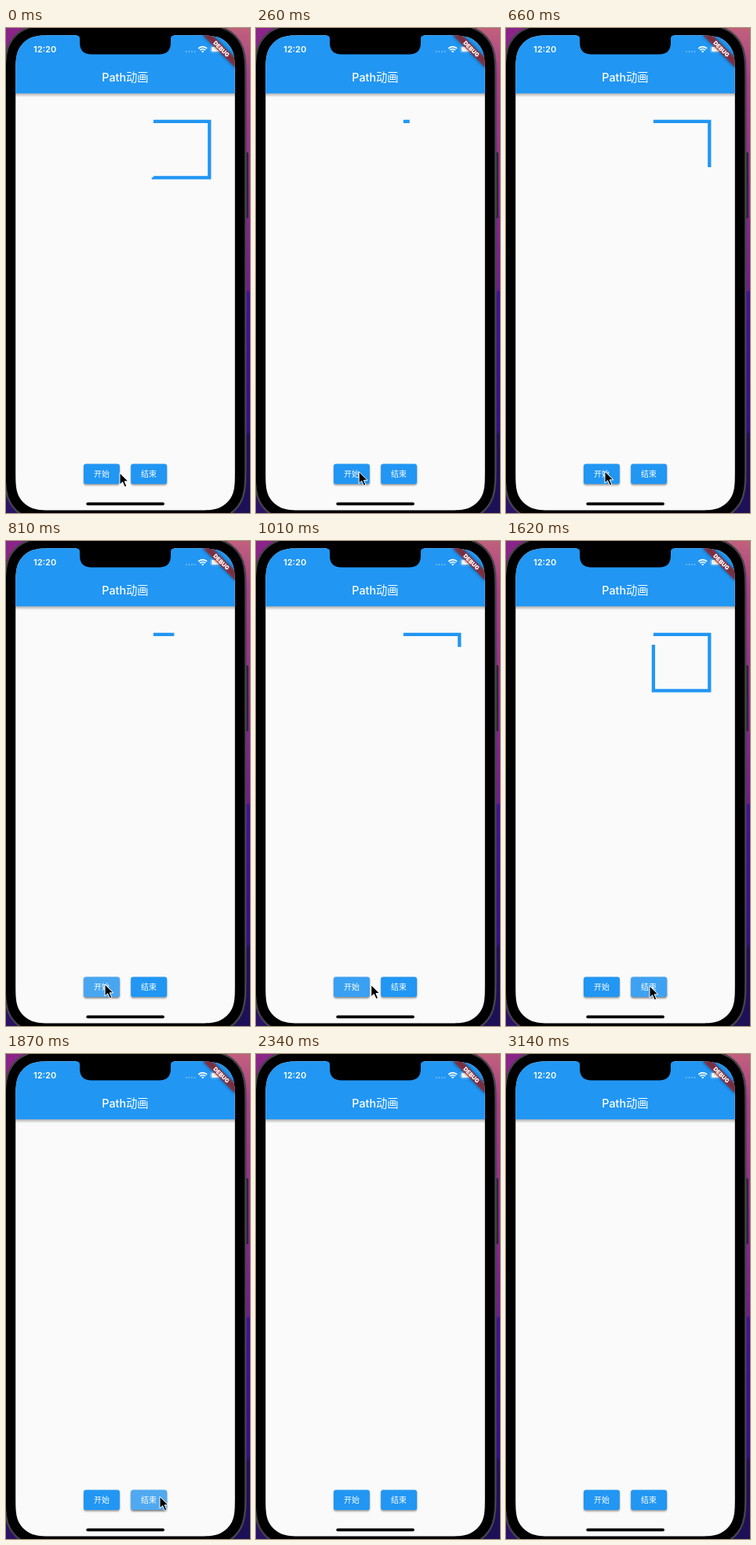
These frames come from a looping animation (311x617 px, 3.24 s). An HTML page:

```html
<!DOCTYPE html>
<html lang="zh">
<head>
<meta charset="utf-8">
<title>Path动画</title>
<style>
  html, body { margin: 0; height: 100%; overflow: hidden; background: #000; }
  svg { display: block; width: 100vw; height: 100vh; }
  text { fill: #fff; font-family: Inter, "Noto Sans CJK SC", "Noto Sans CJK", sans-serif; text-anchor: middle; }
  .shadow { filter: blur(1.1px); fill-opacity: .4; }
  .wide { filter: blur(2.2px); fill-opacity: .5; }
</style>
</head>
<body>
<svg viewBox="0 0 311 617">
  <defs>
    <linearGradient id="wallpaper" x2="0" y2="1">
      <stop offset="0" stop-color="#c0607c"/>
      <stop offset=".1" stop-color="#a83f86"/>
      <stop offset=".54" stop-color="#711c8c"/>
      <stop offset=".545" stop-color="#431294"/>
      <stop offset=".83" stop-color="#340f86"/>
      <stop offset=".84" stop-color="#22105a"/>
      <stop offset="1" stop-color="#1c1056"/>
    </linearGradient>
    <linearGradient id="barShadow" x2="0" y2="1">
      <stop offset="0" stop-opacity=".3"/>
      <stop offset=".5" stop-opacity=".15"/>
      <stop offset="1" stop-opacity="0"/>
    </linearGradient>
    <clipPath id="screen"><path id="screenShape"/></clipPath>
    <g id="button">
      <rect class="shadow" y="1.6" width="45.9" height="25.7" rx="2.9"/>
      <rect width="45.9" height="25.7" rx="2.9" fill="#2196f3"/>
      <rect class="glow" width="45.9" height="25.7" rx="2.9" fill="#e6e6e6"/>
    </g>
  </defs>

  <rect width="311" height="617" fill="url(#wallpaper)"/>
  <rect width="60" height="100" fill="#8a2488"/>
  <rect y="500" width="60" height="117" fill="#2a1266"/>
  <rect x="304" y="158" width="5" height="84" rx="1.5" fill="#2b2430"/>
  <path id="frame" stroke="#45434a" stroke-width="2.4"/>

  <g clip-path="url(#screen)">
    <rect width="311" height="617" fill="#fafafa"/>
    <rect y="83" width="311" height="5" fill="url(#barShadow)"/>
    <rect width="311" height="83.1" fill="#2196f3"/>
    <text x="152" y="68" font-size="14.3" font-weight="500">Path动画</text>
    <text x="49.6" y="31" font-size="11" font-weight="600">12:20</text>
    <path d="M229 30h13" stroke="#fff" stroke-opacity=".45" stroke-width="1.7" stroke-dasharray="1.7 1.9"/>
    <path d="M245.3 26.1a7.7 7.7 0 0 1 10.8 0M247.3 28.2a4.9 4.9 0 0 1 6.8 0" fill="none" stroke="#fff" stroke-width="1.7"/>
    <path d="M249 29.6a2.4 2.4 0 0 1 3.4 0l-1.7 1.9z" fill="#fff"/>
    <rect x="260.6" y="22.9" width="16.4" height="8.2" rx="2.3" fill="none" stroke="#fff" stroke-opacity=".45" stroke-width=".8"/>
    <rect x="261.9" y="24.1" width="13.8" height="5.8" rx="1.3" fill="#fff"/>
    <g transform="translate(291.7 9.4) rotate(45)">
      <rect class="wide" x="-29" y="20" width="58" height="8.6"/>
      <rect x="-29" y="20" width="58" height="8.6" fill="#b71c1c" fill-opacity=".63"/>
      <text y="27" font-size="7.3" font-weight="900">DEBUG</text>
    </g>
    <path id="square" d="M187.9 118.9h71.4v71.4H187.9Z" pathLength="1" fill="none" stroke="#2196f3" stroke-width="4.3"/>
    <g id="start" transform="translate(99 554.4)"></g>
    <g id="stop" transform="translate(159.2 554.4)"></g>
    <g font-size="10" font-weight="500">
      <text x="122" y="571">开始</text>
      <text x="182" y="571">结束</text>
    </g>
    <rect x="102.3" y="603.6" width="99.6" height="3.6" rx="1.8"/>
  </g>
  <path d="M90 9V9.5q4 0 4 4v5q0 15 15 15h86q15 0 15-15v-5q0-4 4-4V9Z"/>
  <path id="cursor" d="M0 0V15L3.5 11.7 6.3 17.8 8.8 16.7 6.2 10.8H10.9Z" stroke="#fff" stroke-linejoin="round"/>
</svg>
<script>
const LOOP = 3240, START = 724, STOP = 1715, LEAVE = 2330;
const PERIOD = 940;

const $ = id => document.getElementById(id);
const clamp = v => Math.min(1, Math.max(0, v));
const ramp = (t, from, to) => clamp((t - from) / (to - from));
const easeOut = v => 1 - (1 - v) ** 2;

// Rounded rectangle whose curvature eases into the straight sides.
function smoothRect(x, y, w, h, r) {
  const half = [[0, 1.529], [0, 1.088], [0, .868], [.075, .631], [.169, .373]];
  const curve = [...half, ...half.map(([u, v]) => [v, u]).reverse()];
  const corner = (cx, cy, sx, sy) => {
    const points = sx === sy ? curve : curve.toReversed();
    const [first, ...rest] = points.map(([u, v]) => `${cx + sx * u * r} ${cy + sy * v * r}`);
    return `L${first}C${rest.join(" ")}`;
  };
  const path = corner(x, y, 1, 1) + corner(x + w, y, -1, 1) +
    corner(x + w, y + h, -1, -1) + corner(x, y + h, 1, -1);
  return "M" + path.slice(1) + "Z";
}

// Cursor trips: start time, end time, distance in x and y.
const moves = [[60, 480, -19, -2], [930, 1330, 57, 2], [1650, 1870, 13, -3], [2130, 2340, 40, 44]];

function cursorAt(t) {
  let x = 145, y = 566;
  for (const [from, to, dx, dy] of moves) {
    const part = easeOut(ramp(t, from, to));
    x += dx * part;
    y += dy * part;
  }
  return [x, y];
}

// Share of the square drawn; pressing start begins again from zero.
function progress(t) {
  if (t >= STOP) return 0;
  return t < START ? (.75 + t / PERIOD) % 1 : (t - START) / PERIOD % 1;
}

function glow(id, amount) {
  $(id).querySelector(".glow").style.opacity = amount;
  $(id).querySelector(".shadow").style.fillOpacity = .4 + amount / 2;
}

function draw(t) {
  const drawn = progress(t);
  $("square").style.visibility = drawn ? "visible" : "hidden";
  $("square").setAttribute("stroke-dasharray", `${drawn} 2`);
  glow("start", .2 * (ramp(t, START, 760) - ramp(t, 810, 1330)));
  glow("stop", .24 * (ramp(t, 1450, 1730) - ramp(t, 2130, 2330)));
  $("cursor").setAttribute("transform", `translate(${cursorAt(t)})`);
  $("cursor").style.visibility = t < LEAVE ? "visible" : "hidden";
}

$("screenShape").setAttribute("d", smoothRect(12.2, 9.3, 279.6, 604.2, 34));
$("frame").setAttribute("d", smoothRect(-1.4, -4, 306.8, 630.5, 47));
for (const id of ["start", "stop"]) $(id).append($("button").cloneNode(true));

const begin = performance.now();
function tick() {
  draw((performance.now() - begin) % LOOP);
  requestAnimationFrame(tick);
}
tick();
</script>
</body>
</html>
```
